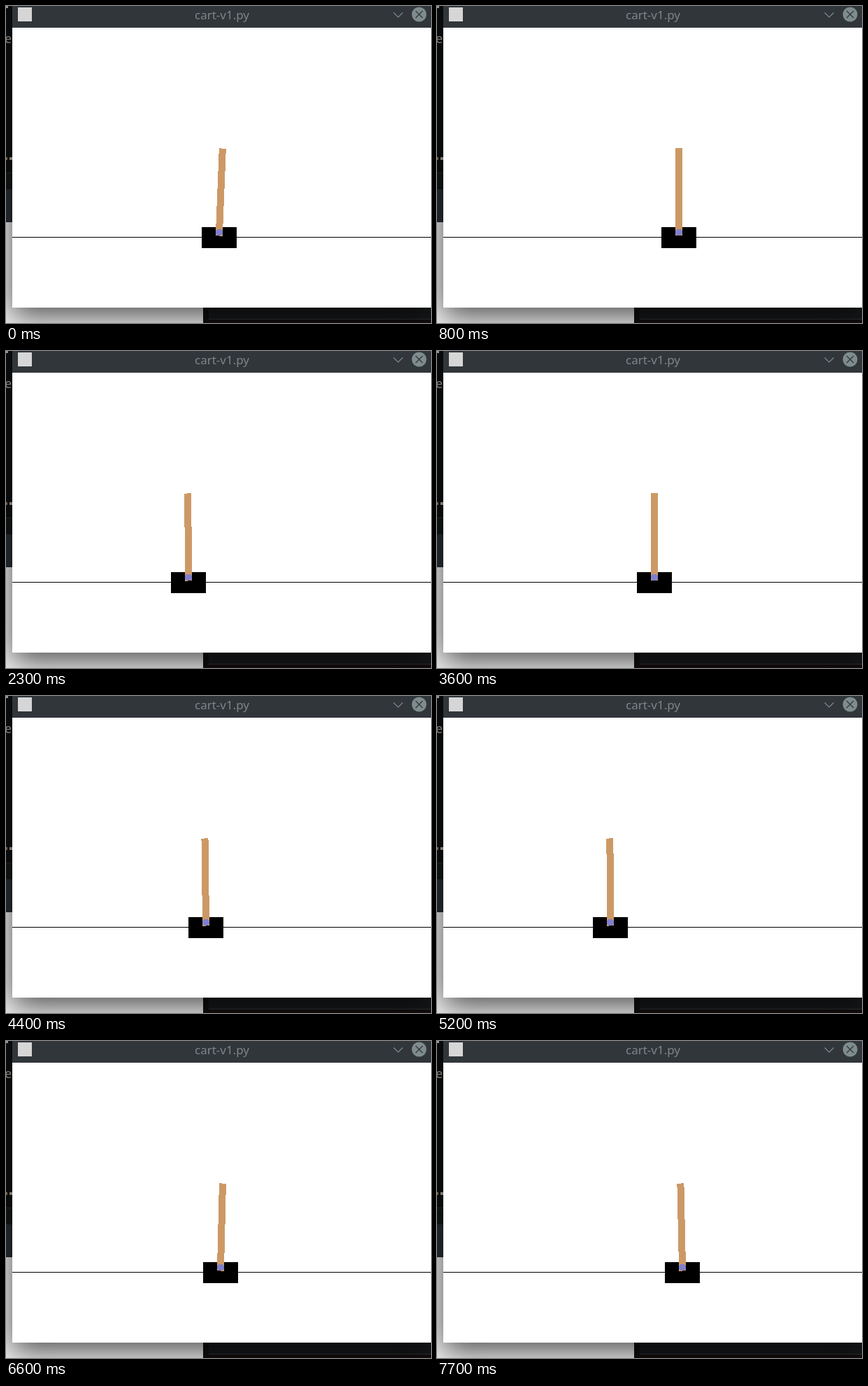
An HTML page that plays this animation: 608x453 px, repeating every 7800 ms.

```html
<!DOCTYPE html>
<html lang="en">
<head>
<meta charset="utf-8">
<title>cart-v1.py</title>
<style>
  html, body { margin: 0; width: 100%; height: 100%; overflow: hidden; background: #0c0f10; }
  svg { position: absolute; left: 0; top: 0; width: 608px; height: 453px; }
  .window {
    position: absolute; left: 9px; top: -30px; width: 600px; height: 461px;
    background: #fff; box-shadow: 0 12px 40px rgba(0, 0, 0, .68);
  }
  text { font-family: "Noto Sans", sans-serif; font-size: 17px; }
  .crisp { shape-rendering: crispEdges; }
</style>
</head>
<body>
<svg viewBox="0 0 608 453">
  <rect y="238" width="9" height="1" fill="#2a2d2f"/>
  <rect y="239" width="9" height="23" fill="#141819"/>
  <rect y="262" width="9" height="47" fill="#2b3036"/>
  <rect y="309" width="282" height="144" fill="#f0f0f0"/>
  <rect x="290" y="431" width="318" height="17" fill="#16191b"/>
  <rect x="290" y="447" width="318" height="1" fill="#303436"/>
  <rect x="283" y="448" width="325" height="5" fill="#150c0c"/>
  <rect width="3" height="3" fill="#bbb"/>
  <text x="-2" y="53" fill="#b8aca0" style="font-size:18px">e</text>
  <rect y="216" width="2" height="4" fill="#a87a48"/>
  <rect x="5" y="216" width="4" height="4" fill="#b0b4b4"/>
</svg>
<div class="window"></div>
<svg viewBox="0 0 608 453">
  <rect x="9" width="599" height="31" fill="#31363b"/>
  <rect x="17" y="2" width="20" height="20" fill="#d6d6d6"/>
  <text x="309" y="19" text-anchor="middle" fill="#7f8588">cart-v1.py</text>
  <path d="M554.5 9.5l6.5 6.5 6.5-6.5" fill="none" stroke="#7f8c8d" stroke-width="1.2"/>
  <circle cx="591" cy="12" r="10.5" fill="#7f8c8d"/>
  <path d="M586 7l10 10m0-10l-10 10" stroke="#31363b" stroke-width="1.3"/>
  <rect class="crisp" x="9" y="330" width="599" height="1"/>
  <g id="cart" class="crisp">
    <rect x="-25" y="316" width="50" height="30"/>
    <g transform="translate(0 323.5)">
      <rect id="pole" x="-5" y="-120" width="10" height="125" fill="#cc9966"/>
      <circle r="5" fill="#8080cc"/>
    </g>
  </g>
</svg>
<script>
  const STEP = 100, STEPS = 78;

  // Every episode restarts near the centre, then moves under constant acceleration
  // while the pole turns steadily. Units: pixels, degrees and steps.
  const episodes = [
    { start: 0, x: 305, speed: 3.5, accel: .42, lean: 2.3, turn: -.3 },
    { start: 10, x: 303.3, speed: -1.63, accel: -.25, lean: 1.1, turn: -.115 },
    { start: 25, x: 305, speed: -1.74, accel: .416, lean: -1, turn: .08 },
    { start: 39, x: 309, speed: -4.69, accel: 0, lean: -1, turn: .055 },
    { start: 53, x: 308, speed: -4.8, accel: .31, lean: -1, turn: .1 },
    { start: 65, x: 303, speed: 4, accel: 0, lean: 1.64, turn: -.24 }
  ];

  const cart = document.getElementById("cart");
  const pole = document.getElementById("pole");

  function draw() {
    const step = Math.floor(performance.now() / STEP) % STEPS;
    const e = episodes.findLast(e => e.start <= step);
    const n = step - e.start;
    const x = e.x + e.speed * n + e.accel * n * n / 2;
    cart.setAttribute("transform", `translate(${Math.round(x)} 0)`);
    pole.setAttribute("transform", `rotate(${e.lean + e.turn * n})`);
    requestAnimationFrame(draw);
  }
  draw();
</script>
</body>
</html>
```
